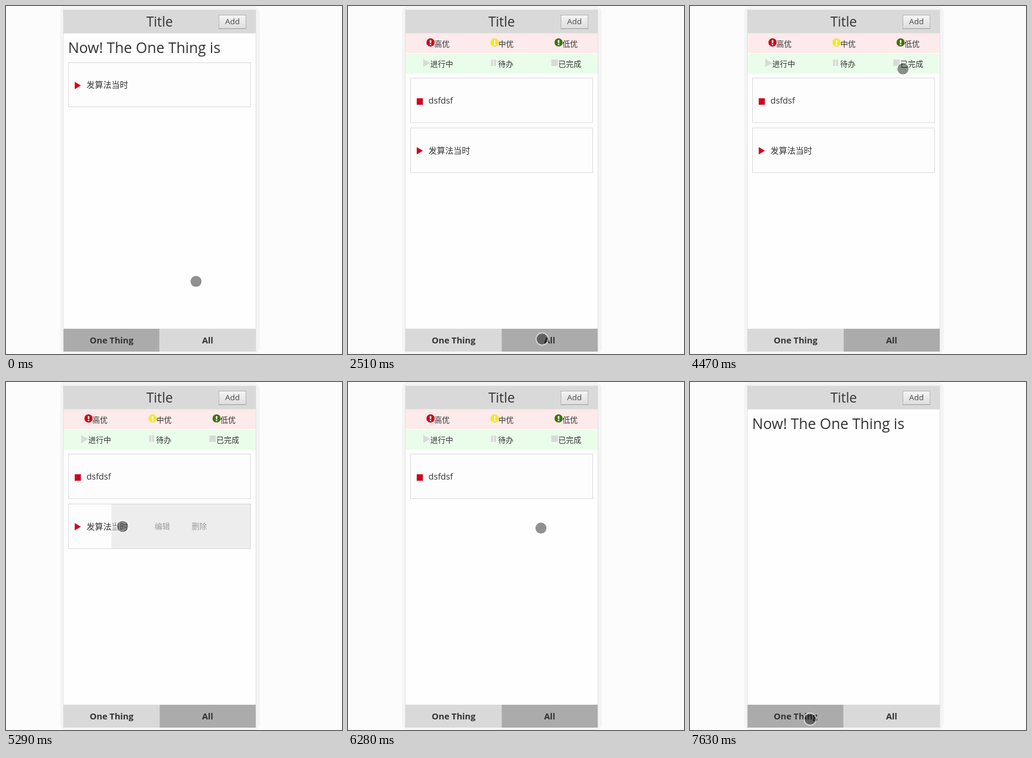
Animation of 572x592 px, one loop 8000 ms. Source, as an HTML page with a canvas:

```html
<!DOCTYPE html>
<html lang="en">
<head>
<meta charset="utf-8">
<title>One Thing</title>
<style>
  html, body { margin: 0; width: 100%; height: 100%; overflow: hidden; background: #fcfcfc; }
  canvas { display: block; width: 572px; height: 592px; }
</style>
</head>
<body>
<canvas id="stage"></canvas>
<script>
const W = 572, H = 592, LOOP = 8000;
const SHOW_ALL = 730, SWIPE = 5050, DELETE = 6280, SHOW_ONE = 7630;
const LEFT = 98, WIDTH = 327, MID = LEFT + WIDTH / 2;
const RED = '#d0021b', GREY = '#d9d9d9', DARK = '#ababab', INK = '#333';
const LATIN = '"Open Sans", "Noto Sans", sans-serif';
const HAN = '"Noto Sans CJK SC", "Noto Sans CJK", "Noto Sans CJK JP", sans-serif';
const SMALL = '350 13px ' + HAN;

// The screen is sampled once per TICK; each stop of the pointer is reached
// by a straight move that takes REACH ticks at most.
const TICK = 138.5, REACH = 3;
const stops = [
  { at: 0, x: 323.5, y: 468.5 },
  { at: 3, x: 330.5, y: 573.5 },   // press "All"
  { at: 18, x: 330.5, y: 566.5 },
  { at: 20, x: 337.5, y: 249.5 },
  { at: 25, x: 337.5, y: 239 },
  { at: 32, x: 362.5, y: 107 },    // point at the filters
  { at: 34, x: 363.5, y: 236.5 },
  { at: 37, x: 184.5, y: 241 },    // swipe the row
  { at: 39, x: 212.5, y: 250.5 },
  { at: 42, x: 304.5, y: 252.5 },
  { at: 45, x: 328.5, y: 248.5 },  // delete
  { at: 47, x: 317.5, y: 276 },
  { at: 51, x: 228.5, y: 542.5 },
  { at: 53, x: 204.5, y: 573.5 }   // press "One Thing"
];

const canvas = document.getElementById('stage');
const ctx = canvas.getContext('2d');
const ratio = window.devicePixelRatio || 1;
canvas.width = W * ratio;
canvas.height = H * ratio;
ctx.scale(ratio, ratio);

const clamp = v => Math.min(1, Math.max(0, v));
const mix = (a, b, p) => a + (b - a) * p;

function rect(x, y, w, h, color) {
  ctx.fillStyle = color;
  ctx.fillRect(x, y, w, h);
}

function frame(x, y, w, h, color) {
  ctx.strokeStyle = color;
  ctx.lineWidth = 1;
  ctx.strokeRect(x + 0.5, y + 0.5, w - 1, h - 1);
}

function text(str, x, y, font, align = 'left', color = INK) {
  ctx.font = font;
  ctx.textAlign = align;
  ctx.fillStyle = color;
  ctx.fillText(str, x, y);
}

function disc(x, y, r, color) {
  ctx.fillStyle = color;
  ctx.beginPath();
  ctx.arc(x, y, r, 0, Math.PI * 2);
  ctx.fill();
}

function triangle(x, y, w, h, color) {
  ctx.fillStyle = color;
  ctx.beginPath();
  ctx.moveTo(x, y);
  ctx.lineTo(x + w, y + h / 2);
  ctx.lineTo(x, y + h);
  ctx.fill();
}

function drawShell() {
  rect(0, 0, W, H, '#fcfcfc');
  ctx.fillStyle = '#f4f4f4';
  ctx.beginPath();
  ctx.roundRect(92, 0, 340, H, 12);
  ctx.fill();
  rect(LEFT - 1, 6, WIDTH + 2, 583, '#e2e2e2');
  rect(LEFT, 7, WIDTH, 582, '#fefefe');
}

function drawHeader() {
  rect(LEFT, 7, WIDTH, 39, GREY);
  rect(LEFT, 46, WIDTH, 1, '#e8e8e8');
  text('Title', MID, 35, '22.9px ' + LATIN, 'center');
  const shade = ctx.createLinearGradient(0, 15, 0, 39);
  shade.addColorStop(0, '#f5f5f5');
  shade.addColorStop(1, '#ddd');
  rect(362, 15, 47, 24, shade);
  frame(362, 15, 47, 24, '#b4b4b4');
  rect(362, 38, 47, 1, '#999');
  text('Add', 385.5, 31, '13.4px ' + LATIN, 'center', '#444');
}

function drawTabs(active) {
  ['One Thing', 'All'].forEach((label, i) => {
    const w = WIDTH / 2, x = LEFT + i * w;
    rect(x, 549, w, 39, i === active ? DARK : GREY);
    text(label, x + w / 2, 574, 'bold 14.7px ' + LATIN, 'center');
  });
}

function drawItem(y, label, font, done) {
  const top = Math.round(y), h = Math.round(y + 76.8) - top;
  rect(106, top, 311, h, '#fdfdfd');
  frame(106, top, 311, h, GREY);
  if (done) rect(117, top + 35, 10.5, 11, RED);
  else triangle(117, top + 33, 10.5, 12.5, RED);
  text(label, 137, y + 43.5, font);
}

function alertIcon(color) {
  return x => {
    disc(x + 7.5, 62, 7, color);
    rect(x + 6.3, 58, 2.4, 5, '#fff');
    rect(x + 6.3, 64.3, 2.4, 2.2, '#fff');
  };
}

function pauseIcon(x) {
  for (const dx of [1, 6]) rect(x + dx, 91, 3.7, 11, GREY);
}

const priorities = [
  ['高优', alertIcon(RED)], ['中优', alertIcon('#f8e71c')], ['低优', alertIcon('#417505')]
];
const states = [
  ['进行中', x => triangle(x + 1, 90, 12, 14, GREY)],
  ['待办', pauseIcon],
  ['已完成', x => rect(x + 1, 91, 11, 11, GREY)]
];

// Three centred groups, each an icon followed by its label
function drawFilterRow(groups, y, h, color, iconWidth) {
  rect(LEFT, y, WIDTH, h, color);
  groups.forEach(([label, icon], i) => {
    const center = LEFT + WIDTH * (2 * i + 1) / 6 + 0.5;
    const x = center - (iconWidth + label.length * 13) / 2;
    icon(x);
    text(label, x + iconWidth, y + 22, SMALL);
  });
}

function drawActions(alpha) {
  ctx.globalAlpha = alpha;
  rect(179.5, 208, 237, 75, GREY);
  text('编辑', 253, 250, SMALL);
  text('删除', 316, 250, SMALL);
  ctx.globalAlpha = 1;
}

function drawPointer(tick) {
  const i = stops.findLastIndex(s => s.at <= tick);
  const from = stops[i], to = stops[i + 1] || from;
  const begin = Math.max(from.at, to.at - REACH);
  const p = to === from ? 0 : clamp((tick - begin) / (to.at - begin));
  const x = mix(from.x, to.x, p), y = mix(from.y, to.y, p);
  disc(x, y, 9.5, 'rgba(0,0,0,.43)');
  ctx.strokeStyle = 'rgba(255,255,255,.55)';
  ctx.lineWidth = 1.7;
  ctx.beginPath();
  ctx.arc(x, y, 10.3, 0, Math.PI * 2);
  ctx.stroke();
}

function draw(time) {
  const tick = Math.floor(time / TICK);
  const all = time >= SHOW_ALL && time < SHOW_ONE;
  const deleted = time >= DELETE;
  const drawTask = y => drawItem(y, '发算法当时', '350 14.2px ' + HAN, false);
  drawShell();
  drawHeader();
  drawTabs(all ? 1 : 0);
  if (all) {
    drawFilterRow(priorities, 47, 33, '#fdeaea', 14);
    drawFilterRow(states, 81, 34, '#eafdea', 13);
    drawItem(122.2, 'dsfdsf', '14.6px ' + LATIN, true);
    if (!deleted) {
      drawTask(207);
      drawActions(clamp((tick * TICK - SWIPE) / 480));
    }
  } else {
    text('Now! The One Thing is', 105.8, 80, '24.9px ' + LATIN);
    if (!deleted) drawTask(95.6);
  }
  drawPointer(tick);
}

const start = performance.now();
function loop() {
  draw((performance.now() - start) % LOOP);
  requestAnimationFrame(loop);
}
loop();
</script>
</body>
</html>
```
